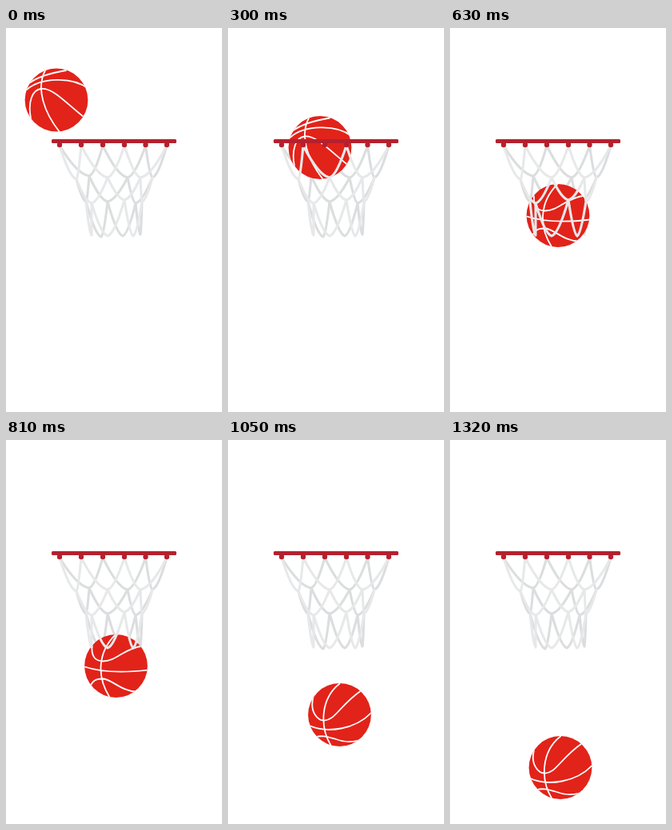
Write an HTML page that moves like this. It is 270 px wide and 480 px high and loops after 1.35 s.

```html
<!DOCTYPE html>
<html lang="en">
<head>
<meta charset="utf-8">
<title>Basketball through a hoop</title>
<style>
  html, body { margin: 0; width: 100%; height: 100%; overflow: hidden; background: #fff; }
  svg { display: block; width: 100vw; height: 100vh; }
  path { fill: none; stroke-linecap: round; stroke-linejoin: round; }
  .net { stroke-width: 3.1; }
  #back { stroke: #dbddde; }
  #front { stroke: #e7e8e9; }
  #seams { stroke: #fff; stroke-width: 1.8; }
</style>
</head>
<body>
<svg viewBox="0 0 270 480">
  <clipPath id="disc"><circle r="39.4"/></clipPath>
  <path id="back" class="net"/>
  <g id="ball">
    <circle r="39.4" fill="#e2231a"/>
    <path id="seams" clip-path="url(#disc)"/>
  </g>
  <path id="front" class="net"/>
  <g id="rim" fill="#b5202e">
    <rect x="57" y="139" width="156" height="5" rx="1.5"/>
  </g>
</svg>
<script>
const LOOP = 1350, STEP = 30;
const $ = id => document.getElementById(id);

// Net: hooks on the rim, then three rows of knots
const hooks = [67, 94, 121, 148, 174.5, 201].map(x => [x, 147]);
const row1 = [[88, 189], [104, 185], [127, 187], [152, 187], [168, 187], [183, 187]];
const row2 = [[100, 217], [107, 219], [127, 217], [148, 215], [162, 219], [170, 217]];
const row3 = [[107, 259], [119, 261], [127, 260], [146, 260], [159, 260], [168, 258]];

const strand = ([x, y], [bx, by]) => {
  const dx = bx - x, dy = by - y;
  return `M${x},${y}C${x + dx * .25},${y + dy * .4} ${bx - dx * .35},${by - dy * .05} ${bx},${by}`;
};
// Each knot hangs from its two upper neighbours, alternating front and back
const hang = (top, low, frontFirst) => {
  low.forEach((knot, i) => {
    const left = top[Math.max(0, i - 1)], right = top[Math.min(5, i + 1)];
    const side = (i % 2 === 0) === frontFirst ? front : back;
    side.push(strand(left, knot), strand(right, knot));
  });
};
const front = [], back = [];
hang(hooks, row1, true);
hang(row1, row2, false);
hang(row2, row3, true);
$('front').setAttribute('d', front.join(''));
$('back').setAttribute('d', back.join(''));

for (const [x] of hooks) {
  const dot = document.createElementNS('http://www.w3.org/2000/svg', 'circle');
  dot.setAttribute('cx', x);
  dot.setAttribute('cy', 146);
  dot.setAttribute('r', 3.2);
  $('rim').append(dot);
}

// Three views of the ball, one for each third of the loop
const poses = [
  'M-14,-37C-26,-14 -15,16 4,40 M-37,-13C-20,-28 20,-30 40,-14' +
  'M-32,23C-36,2 -30,-13 -19,-14C-4,-15 10,2 34,21 M-34,-21C-22,-30 -6,-34 12,-37',
  'M-1,-39C-22,-18 -25,12 -8,39 M-39,1C-15,9 15,8 40,5' +
  'M-30,-24C-31,-10 -24,-6 -16,-6C0,-6 10,-22 33,-25 M-32,25C-28,16 -22,16 -15,16C-4,18 8,32 26,32',
  'M0,-39C-24,-20 -25,15 -11,38 M-39,13C-15,24 20,18 40,-3' +
  'M-33,-22C-38,-2 -26,7 -20,7C-6,8 0,-12 28,-31 M-30,28C-22,25 -14,28 -6,30C4,34 12,35 24,32'
];

// Flight path: time, x, y
const flight = [
  [0, 63, 90], [300, 115, 149.5], [510, 131.5, 202.5], [630, 135, 234.5],
  [810, 137.5, 282.5], [1050, 139.5, 343.5], [1320, 138, 409.5]
];
const last = flight.length - 1;
const rate = (i, k) => (flight[i + 1][k] - flight[i][k]) / (flight[i + 1][0] - flight[i][0]);
const slope = (i, k) => {
  if (i === 0) return 2 * rate(0, k) - slope(1, k);
  if (i === last) return 2 * rate(last - 1, k) - slope(last - 1, k);
  const a = flight[i][0] - flight[i - 1][0], b = flight[i + 1][0] - flight[i][0];
  return (rate(i - 1, k) * b + rate(i, k) * a) / (a + b);
};
// Cubic Hermite through the flight points
const at = (t, k) => {
  let i = 0;
  while (i < last - 1 && t >= flight[i + 1][0]) i++;
  const p = flight[i], q = flight[i + 1], h = q[0] - p[0];
  const u = (t - p[0]) / h, v = 1 - u;
  return v * v * (1 + 2 * u) * p[k] + u * u * (3 - 2 * u) * q[k]
    + h * u * v * (v * slope(i, k) - u * slope(i + 1, k));
};

const start = performance.now();
function draw() {
  const t = Math.floor((performance.now() - start) % LOOP / STEP) * STEP;
  $('ball').setAttribute('transform', `translate(${at(t, 1).toFixed(2)} ${at(t, 2).toFixed(2)})`);
  $('seams').setAttribute('d', poses[Math.floor(t * 3 / LOOP)]);
  requestAnimationFrame(draw);
}
draw();
</script>
</body>
</html>
```
